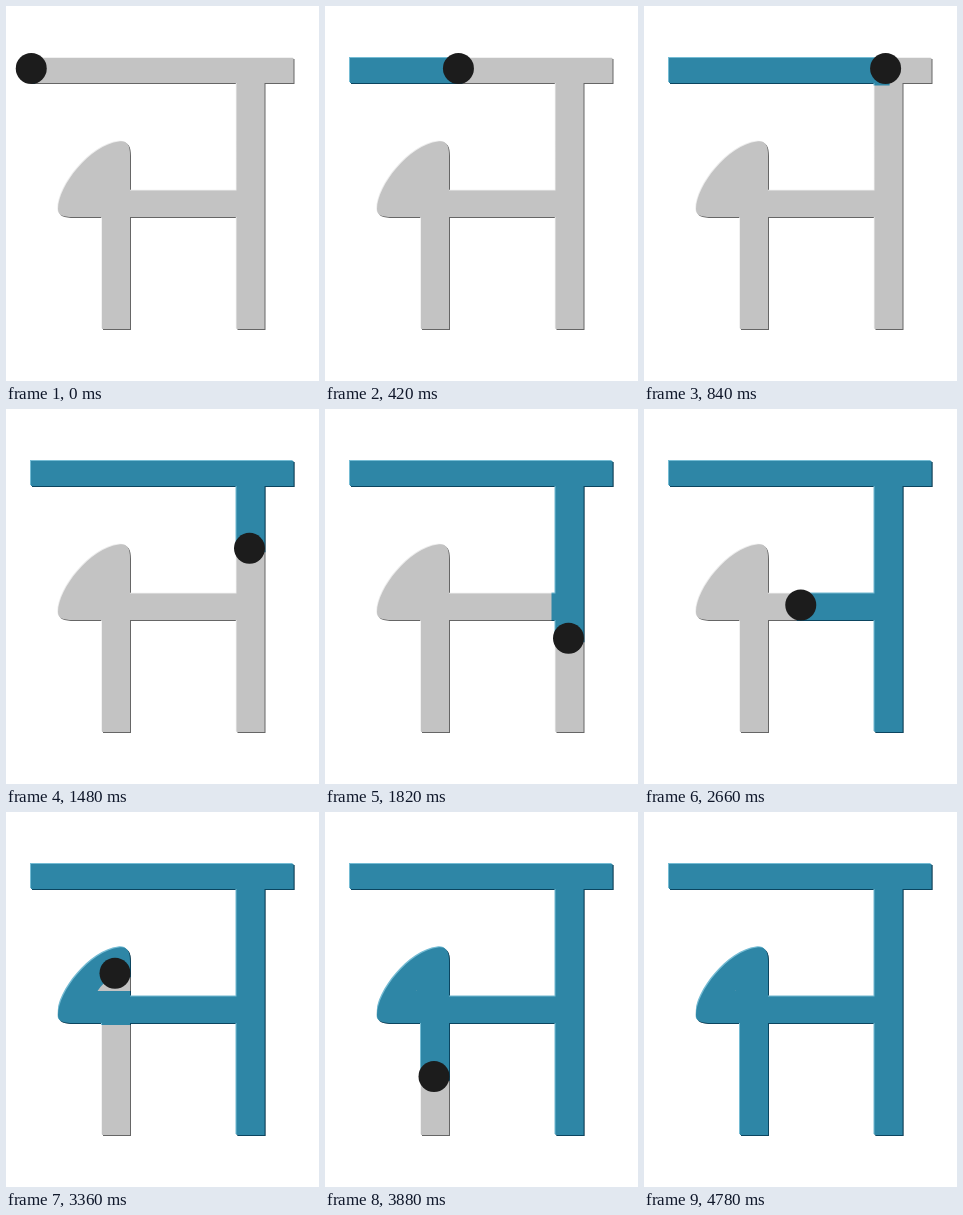
These frames come from a looping animation (313x375 px, 4800 ms). An HTML page:

```html
<!DOCTYPE html>
<html>
<head>
<meta charset="utf-8">
<style>
  html, body { margin: 0; height: 100%; overflow: hidden; background: #fff; }
  svg { display: block; }
</style>
</head>
<body>
<svg width="313" height="375" viewBox="0 0 313 375">
  <defs>
    <path id="glyph" d="M25 52H287.5V77H258.500V323H230.500V211H124V323H96V211
      H68C56 211 52 209 52 203C52 180 84 139 113 135.500C121 134.500 124 139 124 149
      V184.500H230.500V77H25Z"/>
    <mask id="written" maskUnits="userSpaceOnUse" x="0" y="0" width="313" height="375">
      <path id="trail" fill="none" stroke="#fff" stroke-width="34"
        d="M20 62.500H289H243.500V324V196H69C70 172 88 150 109 150V324"/>
    </mask>
  </defs>
  <g>
    <use href="#glyph" x="1" y="1" fill="#666"/>
    <use href="#glyph" x="-.7" y="-.7" fill="#ececec"/>
    <use href="#glyph" fill="#c3c3c3"/>
  </g>
  <g mask="url(#written)">
    <use href="#glyph" x="1" y="1" fill="#0b4560"/>
    <use href="#glyph" x="-1" y="-1" fill="#75bcd4"/>
    <use href="#glyph" fill="#2e86a6"/>
  </g>
  <circle id="pen" r="15.5" fill="#1c1c1c"/>
</svg>
<script>
  const LOOP = 4800, PEN_UP = 4220, LEAD = 4;
  const trail = document.getElementById('trail');
  const pen = document.getElementById('pen');
  const total = trail.getTotalLength();

  // [time in ms, distance along the trail]
  const keys = [
    [0, 5], [1025, 269], [1190, 314.5], [2180, 576], [2325, 704],
    [2660, 790.5], [3360, total - 163], [4180, total], [LOOP, total]
  ];

  function distanceAt(t) {
    const i = keys.findIndex(key => key[0] > t);
    const [t0, d0] = keys[i - 1], [t1, d1] = keys[i];
    return d0 + (d1 - d0) * (t - t0) / (t1 - t0);
  }

  function draw() {
    const t = performance.now() % LOOP;
    const distance = distanceAt(t);
    const { x, y } = trail.getPointAtLength(distance);
    trail.setAttribute('stroke-dasharray', `${distance + LEAD} ${total * 2}`);
    pen.setAttribute('cx', x);
    pen.setAttribute('cy', y);
    pen.setAttribute('visibility', t < PEN_UP ? 'visible' : 'hidden');
    requestAnimationFrame(draw);
  }
  draw();
</script>
</body>
</html>
```
